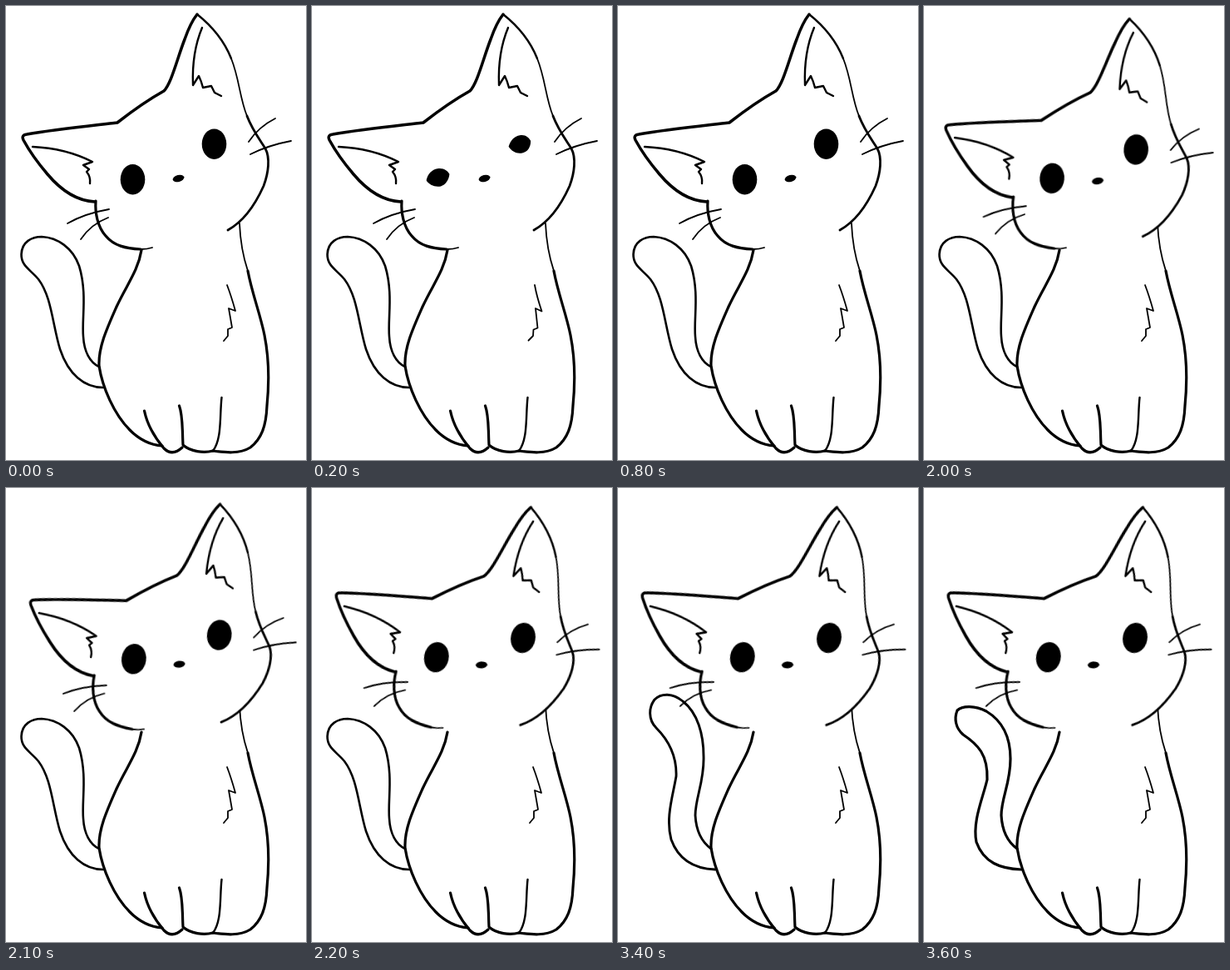
Animation of 361 by 545 pixels, one loop 3.7 s. Source, as an HTML page:

```html
<!DOCTYPE html>
<html lang="en">
<head>
<meta charset="utf-8">
<title>Cat</title>
<style>
html, body { margin: 0; width: 100%; height: 100%; overflow: hidden; background: #fff; }
svg { display: block; width: 361px; height: 545px; }
path { fill: none; stroke: #000; stroke-width: 3.2; stroke-linecap: round; stroke-linejoin: round; }
.thin { stroke-width: 1.8; }
.mid { stroke-width: 2.4; }
.bold { stroke-width: 3.5; }
.cheek { fill: #fff; stroke-width: 2.8; }
.eye { fill: #000; stroke: none; }

.head, .eye, .fur, .tail { animation: 3.7s step-end infinite; }
.head { animation-name: tilt; transform-origin: 207px 207px; }
.left { animation-name: blink-left; }
.right { animation-name: blink-right; }
.fur { animation-name: breathe; }
.tail { animation-name: swish; }

@keyframes tilt {
  0% { transform: none; }
  54.05% { transform: translate(1.5px, 3px) rotate(4.6deg); }
  56.75% { transform: translate(1px, 4.5px) rotate(7.8deg); }
  59.45%, 100% { transform: translate(-3.5px, 5.3px) rotate(10.9deg); }
}

/* Closes in four steps, holds, opens in three. */
@keyframes blink-left {
  0% {
    d: path("M-14.8 0C-14.8 -10 -8.2 -18.2 0 -18.2C8.2 -18.2 14.8 -10 14.8 0C14.8 10 8.2 18.2 0 18.2C-8.2 18.2 -14.8 10 -14.8 0Z");
    animation-timing-function: steps(4);
  }
  10.81%, 13.51% {
    d: path("M-15 2C-12 -3 -8 -6 -3 -8C2 -11 8 -11 11 -13C10 -9 8 -5 5 -2C0 1 -9 3 -15 2Z");
    animation-timing-function: steps(3);
  }
  21.62%, 100% {
    d: path("M-14.8 0C-14.8 -10 -8.2 -18.2 0 -18.2C8.2 -18.2 14.8 -10 14.8 0C14.8 10 8.2 18.2 0 18.2C-8.2 18.2 -14.8 10 -14.8 0Z");
  }
}
@keyframes blink-right {
  0% {
    d: path("M-14.8 0C-14.8 -10 -8.2 -18.2 0 -18.2C8.2 -18.2 14.8 -10 14.8 0C14.8 10 8.2 18.2 0 18.2C-8.2 18.2 -14.8 10 -14.8 0Z");
    animation-timing-function: steps(4);
  }
  10.81%, 13.51% {
    d: path("M-13 6C-9 1 -5 -1 -1 -3C3 -6 7 -6 10.5 -8C11 -2 9 1 5 3C1 6 -6 8 -13 6Z");
    animation-timing-function: steps(3);
  }
  21.62%, 100% {
    d: path("M-14.8 0C-14.8 -10 -8.2 -18.2 0 -18.2C8.2 -18.2 14.8 -10 14.8 0C14.8 10 8.2 18.2 0 18.2C-8.2 18.2 -14.8 10 -14.8 0Z");
  }
}
@keyframes breathe {
  0% {
    d: path("M266 335Q271 348 276 366L268 363L272 386L267 388L267 396L262 402");
    animation-timing-function: steps(4);
  }
  10.81%, 13.51% {
    d: path("M270 335Q270 350 277 367L270 363L271 387L266 389L265 396L259 401");
    animation-timing-function: steps(3);
  }
  21.62%, 100% {
    d: path("M266 335Q271 348 276 366L268 363L272 386L267 388L267 396L262 402");
  }
}

/* Lifts in three steps, then sinks back in two. */
@keyframes swish {
  0% {
    d: path("M117 458C94 458 75 442 65 412C56 383 55 349 39 328C30 317 18 312 18.5 298C19 283 31 277 43 277C62 278 80 290 88 312C98 345 91 375 93 397C94 415 101 428 112 433");
    stroke-width: 2.6;
  }
  83.78% {
    d: path("M117 457C94 458 77 442 66 415C55 382 55 347 44 324C39 313 25 308 25.5 292C26 277 38 270 48 271C68 273 83 287 90 309C98 340 91 375 93 397C94 415 101 428 112 433");
    stroke-width: 2.6;
    animation-timing-function: steps(3);
  }
  91.89% {
    d: path("M117 458C92 457 73 447 64 422C57 396 66 370 70 346C71 318 58 300 46 288C36 278 37 263 44 254C52 246 66 246 78 256C96 270 103 296 103 322C104 352 93 372 93 393C94 412 101 425 112 433");
    stroke-width: 2.9;
    animation-timing-function: steps(2);
  }
  97.29%, 100% {
    d: path("M117 458C92 457 72 450 63 425C58 400 71 372 76 350C77 320 65 308 47 296C38 288 36 277 40 267C46 261 62 261 75 268C95 280 104 300 104 325C104 355 93 372 93 393C94 412 101 425 112 433");
    stroke-width: 3.2;
  }
}
</style>
</head>
<body>
<svg viewBox="0 0 361 545">
  <path class="tail"/>

  <g class="body">
    <path d="M163 293C159 318 145 335 133 361C121 388 111 410 112 432C116 458 130 490 149 509C162 522 175 527 188 528"/>
    <path class="thin" d="M281 261C282 285 285 300 291 318"/>
    <path d="M291 318C296 345 306 370 311 395C317 425 317 450 314 480C313 505 307 520 294 530C281 538 264 536 249 534"/>
    <path d="M166.5 486C170 503 179 518 190 531Q200 541 212 530"/>
    <path d="M208.5 480C213 492 212 510 213 527C222 535 238 537 249 534"/>
    <path class="mid" d="M259.5 470C257 492 260 520 249 534"/>
    <path class="fur thin"/>
  </g>

  <g class="head">
    <path class="cheek" d="M290 132C296 148 305 160 312 171C318 182 316 200 310 216C301 236 287 258 267 269"/>
    <path d="M108 234C107 248 110 265 120 276C130 288 144 291 162 292"/>
    <path class="thin" d="M162 292Q170 292 176 290"/>
    <path class="bold" d="M107 235C86 234 66 221 50 202C38 188 27 172 21 161Q18 155 25 154C60 148 100 144 134 140C152 126 172 112 190 102C199 93 206 63 215 40Q222 20 230 10"/>
    <path class="mid" d="M230 10C249 25 263 43 271 63"/>
    <path class="thin" d="M271 63C281 88 281 110 290 132"/>
    <path class="mid" d="M32 169C56 170 82 176 104 187L93 191L100 196L97 199Q102 205 101 213"/>
    <path class="mid" d="M236 26C228 45 224 70 225 95L232 84Q235 90 237 98L247 96L251 104L259 108"/>
    <path class="thin" d="M292 163Q304 145 324 135M294 178Q316 167 343 162"/>
    <path class="thin" d="M74 261Q95 249 124 244M90 280Q102 262 123 254"/>
    <g transform="translate(152.5 208.3)"><path class="eye left"/></g>
    <g transform="translate(250.5 165.8)"><path class="eye right"/></g>
    <ellipse cx="207.5" cy="207" rx="7" ry="4" transform="rotate(-14 207.5 207)"/>
  </g>
</svg>
</body>
</html>
```
